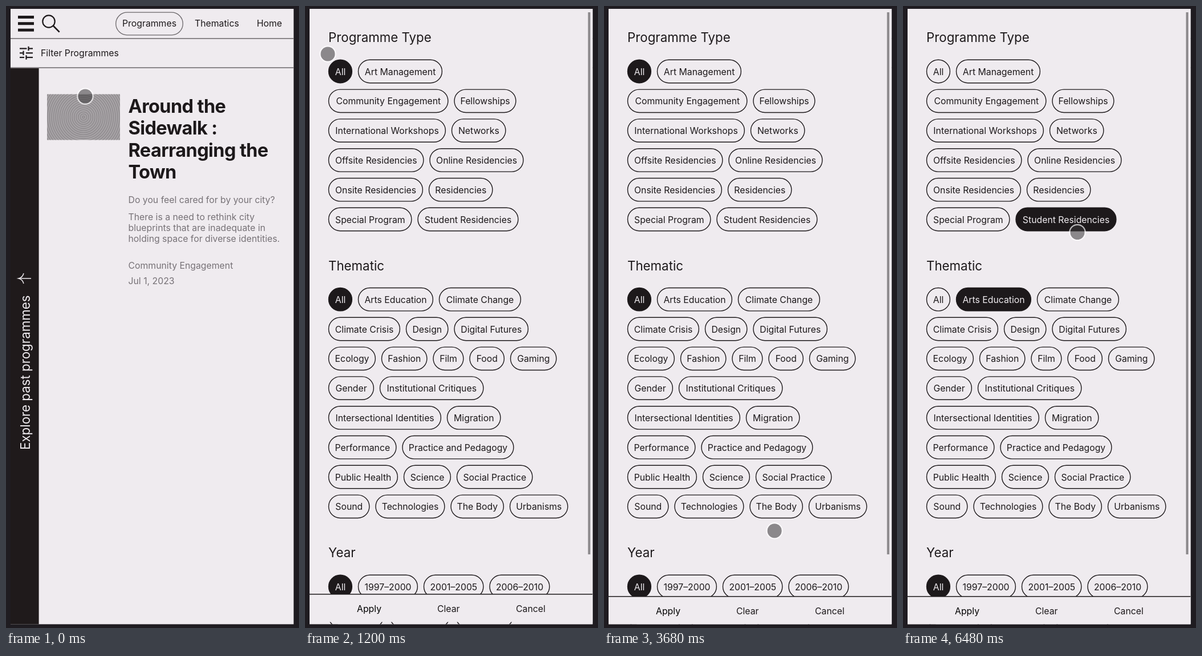
Write an HTML page with a canvas that moves like this. It is 514x1089 px and loops after 6.88 s.

```html
<!DOCTYPE html>
<html lang="en">
<head>
<meta charset="utf-8">
<title>Programme filter</title>
<style>
  html, body { margin: 0; width: 100%; height: 100%; overflow: hidden; background: #1f1c21; }
  canvas { display: block; width: 514px; height: 1089px; }
</style>
</head>
<body>
<canvas id="stage"></canvas>
<script>
const W = 514, H = 1089, LOOP = 6880, STEP = 40;
const PAGE = { x: 8, y: 5, w: 496.6, h: 1077.4 };
const BOTTOM = PAGE.y + PAGE.h;
const FRAME = '#1f1c21', PAPER = '#efebef', INK = '#1d191b', RULE = '#6b676a', MUTED = '#777277', BAR = '#8b888b';
const FACE = 'Inter, Roboto, sans-serif';
const BODY = 15.8, HEAD = 22.3;

const canvas = document.getElementById('stage');
const ratio = window.devicePixelRatio || 1;
canvas.width = W * ratio;
canvas.height = H * ratio;
const ctx = canvas.getContext('2d');

// Each pill is [label, width].
const sections = [
  { title: 'Programme Type', base: 63, top: 114.5, rows: [
    [['All', 41.5], ['Art Management', 147.5]],
    [['Community Engagement', 210], ['Fellowships', 108.5]],
    [['International Workshops', 205.5], ['Networks', 95]],
    [['Offsite Residencies', 167], ['Online Residencies', 164.5]],
    [['Onsite Residencies', 165.5], ['Residencies', 112]],
    [['Special Program', 146], ['Student Residencies', 176.5]]
  ] },
  { title: 'Thematic', base: 462.5, top: 513.7, rows: [
    [['All', 41.5], ['Arts Education', 131.5], ['Climate Change', 143.5]],
    [['Climate Crisis', 125.5], ['Design', 74], ['Digital Futures', 130]],
    [['Ecology', 82.5], ['Fashion', 80], ['Film', 53.5], ['Food', 61], ['Gaming', 81]],
    [['Gender', 79.5], ['Institutional Critiques', 182]],
    [['Intersectional Identities', 197.5], ['Migration', 94]],
    [['Performance', 119], ['Practice and Pedagogy', 195.5]],
    [['Public Health', 121.5], ['Science', 82.5], ['Social Practice', 133]],
    [['Sound', 72], ['Technologies', 121.5], ['The Body', 93], ['Urbanisms', 102]]
  ] },
  { title: 'Year', base: 965, top: 1016.5, rows: [
    [['All', 41.5], ['1997–2000', 104.5], ['2001–2005', 105], ['2006–2010', 105.5]],
    [['2011–2015', 97], ['2016–2020', 105], ['2021–2025', 101]]
  ] }
];

// Pointer path: time, x, y.
const path = [
  [0, 139, 158], [40, 139, 158], [520, 39.5, 83], [1200, 40, 84],
  [1480, 56, 107], [2080, 201, 530], [2180, 207, 551], [2880, 288, 900],
  [3000, 300, 922], [3640, 300, 922], [4400, 195, 529], [4900, 195, 529],
  [5320, 306, 396.5], [LOOP, 306, 396.5]
];
const taps = [[520, 680], [4480, 4640], [5320, 5480], [5840, 6040]];

const clamp01 = v => Math.max(0, Math.min(1, v));

function slope(i, axis) {
  if (i === 0 || i === path.length - 1) return 0;
  const rate = k => (path[k + 1][axis] - path[k][axis]) / (path[k + 1][0] - path[k][0]);
  const a = rate(i - 1), b = rate(i);
  return a * b > 0 ? 2 * a * b / (a + b) : 0;
}

// Monotone cubic interpolation along the path.
function along(t, axis) {
  let i = 0;
  while (i < path.length - 2 && t >= path[i + 1][0]) i++;
  const p = path[i], q = path[i + 1], d = q[0] - p[0];
  const u = (t - p[0]) / d, v = 1 - u;
  return p[axis] * (1 + 2 * u) * v * v + q[axis] * u * u * (3 - 2 * u)
    + d * (slope(i, axis) * u * v * v - slope(i + 1, axis) * u * u * v);
}

function text(str, x, y, { size = BODY, color = INK, weight = 400, align = 'left', spacing = 0 } = {}) {
  ctx.font = `${weight} ${size}px ${FACE}`;
  ctx.letterSpacing = spacing + 'px';
  ctx.textAlign = align;
  ctx.fillStyle = color;
  ctx.fillText(str, x, y);
}

function rect(x, y, w, h, color) {
  ctx.fillStyle = color;
  ctx.fillRect(x, y, w, h);
}

function line(color, width, ...pts) {
  ctx.beginPath();
  pts.forEach(([x, y], i) => i ? ctx.lineTo(x, y) : ctx.moveTo(x, y));
  ctx.strokeStyle = color;
  ctx.lineWidth = width;
  ctx.stroke();
}

function disc(x, y, r, color) {
  ctx.beginPath();
  ctx.arc(x, y, r, 0, Math.PI * 2);
  ctx.fillStyle = color;
  ctx.fill();
}

function ring(x, y, r, color, width) {
  ctx.beginPath();
  ctx.arc(x, y, r, 0, Math.PI * 2);
  ctx.strokeStyle = color;
  ctx.lineWidth = width;
  ctx.stroke();
}

function capsule(x, y, w, h, stroke, width, fill) {
  ctx.beginPath();
  ctx.roundRect(x, y, w, h, h / 2);
  if (fill) { ctx.fillStyle = fill; ctx.fill(); }
  ctx.strokeStyle = stroke;
  ctx.lineWidth = width;
  ctx.stroke();
}

function drawHeader() {
  for (const y of [17, 28.2, 39.6]) rect(21, y, 28, 5, INK);
  ring(75, 27, 10.7, INK, 2.2);
  line(INK, 2.6, [82.7, 34.5], [93.7, 45.7]);

  capsule(192.7, 11.2, 117.6, 39.6, RULE, 1.3);
  text('Programmes', 251.5, 36, { align: 'center' });
  text('Thematics', 331, 36);
  text('Home', 440, 36);
  rect(PAGE.x, 56.2, PAGE.w, 1.5, RULE);

  const ticks = [[74.5, 36.5, 39.5, 39.5], [82.3, 30.5, 30.5, 35], [90, 32, 35.5, 35.5]];
  for (const [y, end, tick, start] of ticks) {
    line(INK, 2.2, [24, y], [end, y]);
    line(INK, 2.2, [tick, y - 3.7], [tick, y + 3.7]);
    line(INK, 2.2, [start, y], [47, y]);
  }
  text('Filter Programmes', 61, 88);
  rect(PAGE.x, 107.3, PAGE.w, 1.5, RULE);
}

function drawSideBar() {
  rect(PAGE.x, 109, 49.6, BOTTOM - 109, '#1f1a1b');
  ctx.save();
  ctx.translate(42, 777);
  ctx.rotate(-Math.PI / 2);
  text('Explore past programmes', 0, 0, { size: HEAD, color: PAPER });
  ctx.restore();
  line(PAPER, 1.5, [44, 477], [22, 477]);
  ctx.beginPath();
  ctx.moveTo(31, 468);
  ctx.quadraticCurveTo(29, 475.5, 22, 477);
  ctx.quadraticCurveTo(29, 478.5, 31, 486);
  ctx.stroke();
}

function drawCard() {
  ctx.save();
  ctx.beginPath();
  ctx.rect(72, 154.5, 128, 80);
  ctx.clip();
  rect(72, 154, 128, 81, '#a7a3a6');
  for (let r = 2; r < 78; r += 3.6) ring(136, 194.5, r, '#8d898c', 1.3);
  ctx.restore();

  ['Around the', 'Sidewalk :', 'Rearranging the', 'Town'].forEach((s, i) =>
    text(s, 214.5, 187 + i * 38.3, { size: 32.5, weight: 700, spacing: -0.6 }));

  const copy = [
    ['Do you feel cared for by your city?', 345],
    ['There is a need to rethink city', 374.5],
    ['blueprints that are inadequate in', 393.7],
    ['holding space for diverse identities.', 413],
    ['Community Engagement', 459.5],
    ['Jul 1, 2023', 486.5]
  ];
  for (const [s, y] of copy) text(s, 214.5, y, { color: MUTED });
}

function drawPills({ title, base, top, rows }, picked) {
  text(title, 41, base, { size: HEAD });
  rows.forEach((row, i) => {
    const y = top + i * 51.8;
    let x = 41.3;
    for (const [label, w] of row) {
      const on = label === picked;
      capsule(x + 0.2, y - 20.2, w - 0.6, 40.4, INK, 1.4, on && INK);
      text(label, x + w / 2, y + 6, { align: 'center', color: on ? PAPER : INK });
      x += w + 10.5;
    }
  });
}

// The footer springs up from below and settles.
function drawFooter(t) {
  const s = (t - 960) / 1000;
  if (s < 0) return;
  const y = 1034 + 49 * Math.exp(-10 * s) * Math.cos(11.2 * s);
  rect(PAGE.x, y, PAGE.w, 48.5, PAPER);
  rect(PAGE.x, y - 0.9, PAGE.w, 1.5, INK);
  text('Apply', 91, y + 31, { color: '#000' });
  text('Clear', 232, y + 31);
  text('Cancel', 370, y + 31);
}

function drawSheet(t) {
  if (t < 760) return;
  const rise = 1 - Math.pow(1 - clamp01((t - 760) / 350), 3);
  const shift = (1 - rise) * PAGE.h;
  const top = PAGE.y + shift;

  ctx.save();
  ctx.beginPath();
  ctx.rect(PAGE.x, top, PAGE.w, BOTTOM - top);
  ctx.clip();
  rect(PAGE.x, top, PAGE.w, BOTTOM - top, PAPER);

  const picks = [t < 5440 ? 'All' : 'Student Residencies', t < 4520 ? 'All' : 'Arts Education', 'All'];
  ctx.save();
  ctx.translate(0, shift);
  sections.forEach((s, i) => drawPills(s, picks[i]));
  ctx.restore();

  const track = Math.max(0, BOTTOM - top - 12);
  rect(496.5, top + 6, 4, track * track / 1196, BAR);
  drawFooter(t);
  ctx.restore();
}

function drawPointer(t) {
  const x = along(t, 1), y = along(t, 2);
  for (const [from, to] of taps) {
    if (t <= from || t >= to) continue;
    const u = (t - from) / (to - from);
    disc(x, y, 14 + 15 * u, `rgba(70, 66, 70, ${0.35 * (1 - u)})`);
  }
  disc(x, y, 12.7, 'rgba(57, 54, 57, 0.55)');
  ring(x, y, 13.7, 'rgba(255, 253, 255, 0.7)', 2.2);
}

function draw(t) {
  ctx.setTransform(ratio, 0, 0, ratio, 0, 0);
  rect(0, 0, W, H, FRAME);
  rect(PAGE.x, PAGE.y, PAGE.w, PAGE.h, PAPER);
  drawHeader();
  drawSideBar();
  drawCard();
  drawSheet(t);
  drawPointer(t);
}

const start = performance.now();
function tick() {
  const t = (performance.now() - start) % LOOP;
  draw(Math.floor(t / STEP) * STEP); // plays at 25 pictures a second
  requestAnimationFrame(tick);
}
tick();
</script>
</body>
</html>
```
